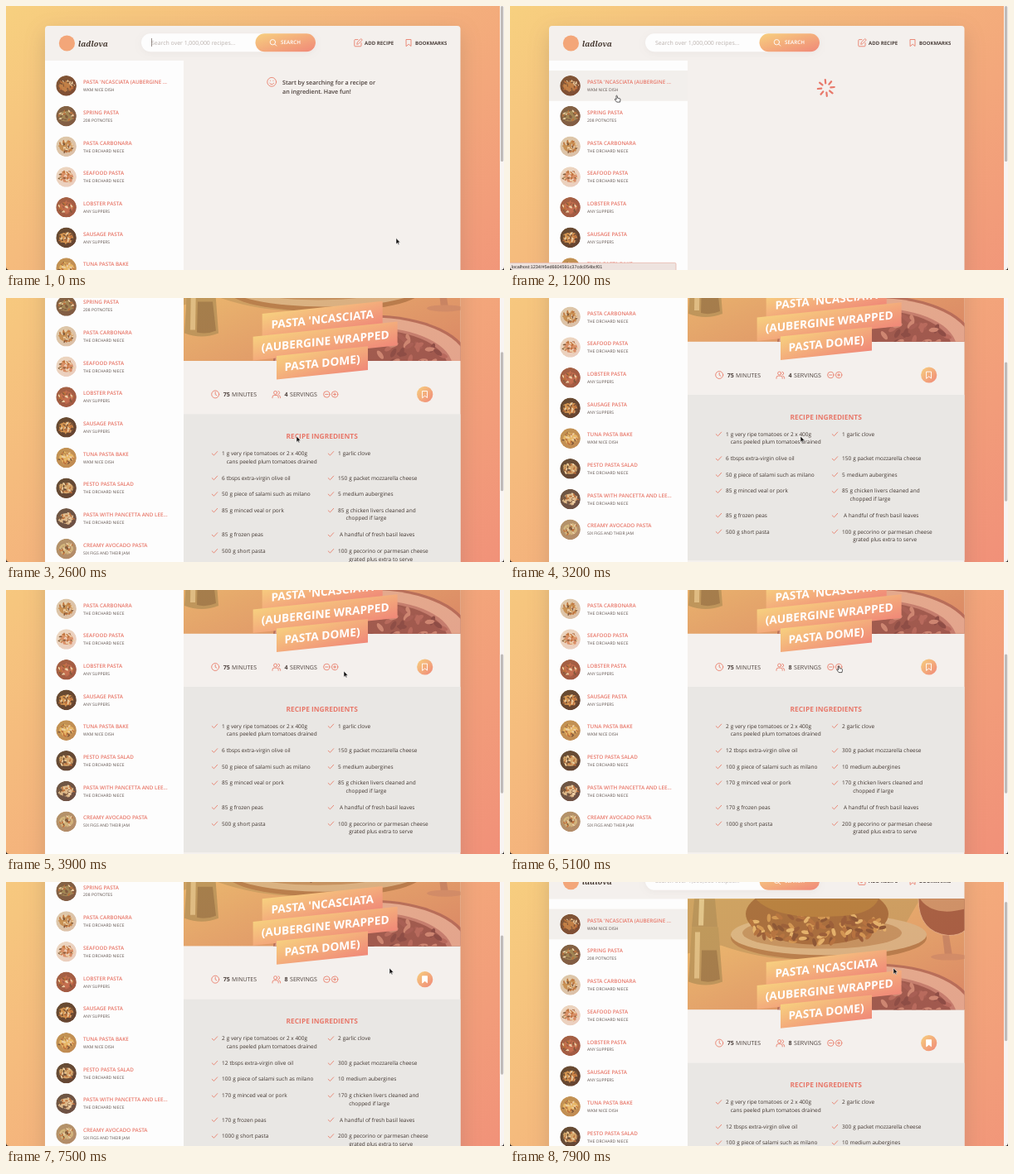
These frames come from a looping animation (600 by 319 pixels, 8000 ms). An HTML page:

```html
<!DOCTYPE html>
<html lang="en">
<head>
<meta charset="utf-8">
<title>Recipe search</title>
<style>
html, body { margin: 0; width: 100%; height: 100%; overflow: hidden; background: #f6c47c; }
svg { display: block; width: 600px; height: 319px; }
text { font-family: "Open Sans", "Noto Sans", sans-serif; text-rendering: geometricPrecision; white-space: pre; }
.line { fill: none; stroke: #e97f6c; stroke-width: .9; stroke-linecap: round; stroke-linejoin: round; }
.white { stroke: #fff; }
</style>
</head>
<body>
<svg id="stage" viewBox="0 0 600 319"></svg>
<script>
const LOOP = 8000, VIEW = 319, SHORT_PAGE = 541, LONG_PAGE = 605;
const CORAL = '#e8786a', INK = '#4c403c', PAPER = '#f4f0ed';
const LOADING = 1080, LOADED = 1650, BOOKMARKED = 6600;
const CLICKS = [4350, 4600, 4850, 5100];
const ROW = 36.7, FONT = 6.5;

// ---- helpers -------------------------------------------------------
const $ = id => document.getElementById(id);
const set = (id, attrs) => { for (const k in attrs) $(id).setAttribute(k, attrs[k]); };
const show = (id, on) => set(id, { visibility: on ? 'visible' : 'hidden' });

// y is the middle of the capitals
const text = (x, y, size, str, fill = INK, weight = 400, more = '') =>
  `<text x="${x}" y="${y + size * .36}" font-size="${size}" fill="${fill}" font-weight="${weight}" ${more}>${str}</text>`;
const line = (d, more = '') => `<path class="line" d="${d}" ${more}/>`;
const shape = (d, fill, more = '') => `<path d="${d}" fill="${fill}" ${more}/>`;
const ring = (x, y, r) => `<circle class="line" cx="${x}" cy="${y}" r="${r}"/>`;
const oval = (x, y, rx, ry, fill, more = '') =>
  `<ellipse cx="${x}" cy="${y}" rx="${rx}" ry="${ry}" fill="${fill}" ${more}/>`;
const rect = (x, y, w, h, fill, more = '') =>
  `<rect x="${x}" y="${y}" width="${w}" height="${h}" fill="${fill}" ${more}/>`;
const ribbon = (x, y, more = '') => line(`M${x - 2.8} ${y - 3.8}h5.6v8l-2.8-2.3-2.8 2.3z`, more);

function random(seed) {
  return () => (seed = seed * 16807 % 2147483647) / 2147483647;
}
function blobs(seed, count, x, y, rx, ry, size, tones) {
  const rnd = random(seed * 7919 + 13);
  let out = '';
  for (let i = 0; i < count; i++) {
    const a = rnd() * 6.283, d = Math.sqrt(rnd());
    const px = (x + Math.cos(a) * d * rx).toFixed(1), py = (y + Math.sin(a) * d * ry).toFixed(1);
    out += oval(px, py, size, size * .45, tones[i % tones.length],
      `transform="rotate(${(rnd() * 180) | 0} ${px} ${py})"`);
  }
  return out;
}

// keys: [time, ...values]
function track(keys, t, ease = u => u) {
  const i = keys.findIndex(k => k[0] > t);
  if (i < 0) return keys[keys.length - 1].slice(1);
  if (!i) return keys[0].slice(1);
  const a = keys[i - 1], b = keys[i], u = ease((t - a[0]) / (b[0] - a[0]));
  return a.slice(1).map((v, j) => v + (b[j + 1] - v) * u);
}
const smooth = u => u * u * (3 - 2 * u);

// ---- content -------------------------------------------------------
const SITES = ['WKM NICE DISH', '208 POTNOTES', 'THE ORCHARD NIECE', 'ANY SUPPERS', 'SIX FIGS AND THEIR JAM'];
// title, site, rim and food tones
const RESULTS = [
  ["PASTA 'NCASCIATA (AUBERGINE ...", 0, '#6b4128', '#b9793f'],
  ['SPRING PASTA', 1, '#6f523a', '#94804e'],
  ['PASTA CARBONARA', 2, '#d9c8b0', '#c08a4c'],
  ['SEAFOOD PASTA', 2, '#ead8ca', '#d48a62'],
  ['LOBSTER PASTA', 3, '#96503a', '#bd6448'],
  ['SAUSAGE PASTA', 3, '#4f3624', '#cf8f48'],
  ['TUNA PASTA BAKE', 0, '#b98a4c', '#e6b962'],
  ['PESTO PASTA SALAD', 2, '#4d3828', '#cfa568'],
  ['PASTA WITH PANCETTA AND LEE...', 2, '#57443a', '#d9b98a'],
  ['CREAMY AVOCADO PASTA', 4, '#a88a66', '#cdb67c']
];

// column x, y, quantity, lines
const INGREDIENTS = [
  [260, 311.3, 1, 'g very ripe tomatoes or 2 x 400g', 'cans peeled plum tomatoes drained'],
  [400, 311.3, 1, 'garlic clove'],
  [260, 340.9, 6, 'tbsps extra-virgin olive oil'],
  [400, 340.9, 150, 'g packet mozzarella cheese'],
  [260, 360.4, 50, 'g piece of salami such as milano'],
  [400, 360.4, 5, 'medium aubergines'],
  [260, 380.1, 85, 'g minced veal or pork'],
  [400, 380.1, 85, 'g chicken livers cleaned and', 'chopped if large'],
  [260, 409.5, 85, 'g frozen peas'],
  [400, 409.5, 0, 'A handful of fresh basil leaves'],
  [260, 429.2, 500, 'g short pasta'],
  [400, 429.2, 100, 'g pecorino or parmesan cheese', 'grated plus extra to serve']
];

const pen = document.createElement('canvas').getContext('2d');
function amount(n) {
  const whole = Math.floor(n), part = ['', '1/4', '1/2', '3/4'][(n - whole) * 4];
  return [whole || '', part].filter(String).join(' ');
}
function ingredients(servings) {
  pen.font = `${FONT}px "Open Sans", "Noto Sans", sans-serif`;
  return INGREDIENTS.map(([x, y, qty, ...lines]) => {
    const label = amount(qty * servings / 4);
    const left = x + pen.measureText(label).width + 2;
    return line(`M${x - 11.8} ${y + .3}l2.3 2.1 4.2-4.6`) + text(x, y, FONT, label, '#40352f') +
      lines.map((s, i) => text(left, y + i * 9.6, FONT, s, '#40352f')).join('');
  }).join('');
}

const result = ([title, site, rim, food], i) => {
  const y = 96.4 + i * ROW;
  return `<g clip-path="url(#dish${i})">` + oval(72.6, y, 12.3, 12.3, rim) +
    oval(72.6, y, 8.5, 6.5, food) +
    blobs(i + 1, 34, 72.6, y, 9, 7, 1.9, [rim, food, '#b5652f', '#ecd7ae', '#6d4a2e']) +
    oval(72.6, y, 12.3, 12.3, 'url(#grad)', 'opacity=".15"') + '</g>' +
    `<clipPath id="dish${i}"><circle cx="72.6" cy="${y}" r="12.3"/></clipPath>` +
    text(93, y - 4.5, 6.3, title, CORAL, 600) + text(93, y + 4.9, 5, SITES[site], '#5f524d');
};

const header =
  oval(73.4, 45, 9.6, 9.6, '#f3a679') +
  text(87, 45.2, 9.2, 'ladlova', '#44372f', 700, 'style="font-family:\'Noto Serif\',\'Liberation Serif\',serif;font-style:italic"') +
  rect(163, 33.2, 210, 22, '#fdfdfd', 'rx="11" style="filter:drop-shadow(0 2px 5px rgba(97,85,81,.06))"') +
  rect(300.5, 33.2, 72.5, 22, 'url(#grad)', 'rx="11"') +
  text(175, 44.2, 6.95, 'Search over 1,000,000 recipes...', '#bbb2ae') +
  rect(175, 39, .7, 10, '#6d605b', 'id="caret"') +
  '<circle class="line white" cx="321.4" cy="43.7" r="3.2"/>' + line('M323.8 46.1l2 2', 'style="stroke:#fff"') +
  text(331, 44.2, 6.3, 'SEARCH', '#fff', 600) +
  line('M424 40.6h-3.4q-.8 0-.8.8v6.6q0 .8.8.8h6.6q.8 0 .8-.8v-3.4M422.8 46l.5-2.1 4.4-4.4 1.6 1.6-4.4 4.4z') +
  text(432, 44.6, 6.05, 'ADD RECIPE', INK, 700) +
  ribbon(485.2, 44.3) + text(493, 44.6, 5.95, 'BOOKMARKS', INK, 700);

const welcome = '<g id="welcome">' + ring(320.2, 91.8, 5.4) +
  line('M317.7 93.3q2.5 3 5 0M318.4 90.2v.1M322 90.2v.1') +
  text(333, 92, 7.15, 'Start by searching for a recipe or', INK, 600) +
  text(333, 103.5, 7.15, 'an ingredient. Have fun!', INK, 600) + '</g>';

const spinner = '<g id="spinner">' + [...Array(8).keys()].map(i =>
  `<path d="M0-5.6V-10" stroke="${CORAL}" stroke-width="2.2" stroke-linecap="round" transform="rotate(${i * 45})"/>`).join('') + '</g>';

// table, plate with the dome, shaker, glass, front plate, fork
const photo = '<g clip-path="url(#frame)">' + rect(214, 65.5, 334, 134.5, 'url(#table)') +
  shape('M214 66h280l-30 52q-110 40-210 4l-40 10z', '#c3985a') +
  oval(384, 113, 118, 27, '#a9713f') + oval(384, 109, 118, 25, '#d3b283') + oval(376, 107, 96, 19, '#b98a58') +
  oval(370, 84, 86, 37, '#945a2c') +
  blobs(5, 120, 370, 99, 82, 20, 5, ['#c98d47', '#713d22', '#dfb066', '#a5612f', '#834727']) +
  shape('M296 66h148q-8 20-54 21-70 4-94-21z', '#a8702f') +
  shape('M222 66h25l3 34h-31z', '#a98650') + shape('M228 66h6l-1 32h-6z', '#dcc48e') +
  shape('M219 100h32l5 66q-20 8-41 0z', '#b08d52') + shape('M223 106h6l-1 56h-6z', '#d9bd84') +
  shape('M231 128h18l4 35q-12 5-23 2z', '#8f6d3e') +
  shape('M492 66q0 40 36 44 14 0 20-6V66z', '#934b34') + shape('M494 66q16 22 54 12V66z', '#c58a62') +
  line('M492 66q0 40 36 44 14 0 20-6', 'style="stroke:#e0b08c"') +
  shape('M521 110h8l4 25h-9z', '#bd7d5c') + oval(529, 136, 22, 4, '#c98762') +
  oval(440, 200, 118, 56, '#a86250') + oval(440, 203, 116, 56, '#e0ac92') +
  oval(440, 207, 98, 48, '#b9776a') + oval(440, 207, 92, 45, '#8a4a42') +
  blobs(9, 80, 440, 192, 88, 26, 6, ['#a85f55', '#723a37', '#c4826f', '#94504a']) +
  line('M360 162q22-4 34-18', 'style="stroke:#e8cdb0;stroke-width:2"') +
  rect(214, 65.5, 334, 134.5, 'url(#grad)', 'opacity=".22"') + '</g>';

const banner = [["PASTA 'NCASCIATA", 381.2, 145], ['(AUBERGINE WRAPPED', 384.6, 174], ['PASTA DOME)', 381, 110]]
  .map(([s, x, w], i) => `<g transform="translate(${x} ${149.2 + i * 26.4}) skewY(-6)">` +
    rect(-w / 2, -14.3, w, 28.6, 'url(#grad)') +
    text(0, 0, 13.7, s, '#fff', 700, 'text-anchor="middle"') + '</g>').join('');

const details = ring(252.2, 240, 4.5) + line('M252.2 237.3v2.9l1.7 1') +
  text(261.7, 240, 7.1, '75', INK, 700) + text(272, 240, 6.95, 'MINUTES') +
  ring(324.6, 238, 2) +
  line('M321 244.3v-1q0-2.2 2.2-2.2h2.8q2.2 0 2.2 2.2v1M328 236.2q1.7.4 1.7 1.9t-1.7 1.9M329 241.3q1.6.5 1.6 2v1') +
  text(335.5, 240, 7.1, '4', INK, 700, 'id="servings"') + text(342, 240, 7.1, 'SERVINGS') +
  [386.3, 396.1].map((x, i) => ring(x, 240, 3.7) + line(`M${x - 1.6} 240h3.2` + (i ? `M${x} 238.4v3.2` : ''))).join('') +
  oval(504.7, 240, 9.6, 9.6, 'url(#grad)') + ribbon(504.7, 239.9, 'id="mark" style="stroke:#fff"');

const recipe = '<g id="recipe">' + photo + banner + details +
  rect(214, 264, 333.5, 200, '#e9e7e4') +
  text(380.7, 290.6, 8.4, 'RECIPE INGREDIENTS', CORAL, 700, 'text-anchor="middle"') +
  '<g id="list"></g></g>';

const grad = (id, from, to) => `<linearGradient id="${id}" x2="1" y2="1"><stop stop-color="${from}"/><stop offset="1" stop-color="${to}"/></linearGradient>`;

$('stage').innerHTML = '<defs>' +
  grad('grad', '#f7d07f', '#f08878') + grad('table', '#ecc06c', '#d48560') +
  '<clipPath id="frame"><rect x="214" y="65.5" width="333.5" height="134.2"/></clipPath></defs>' +
  '<g id="page">' + rect(0, 0, 595, SHORT_PAGE, 'url(#grad)', 'id="back"') +
  rect(47, 24, 500.5, 493, PAPER, 'id="card" rx="3.8" style="filter:drop-shadow(0 8px 12px rgba(97,85,81,.22))"') +
  rect(47, 66, 167, 451, '#fdfdfd', 'id="side"') +
  rect(47, 78, 167, ROW, '#f2efec', 'id="active"') +
  header + RESULTS.map(result).join('') + welcome + spinner + recipe + '</g>' +
  rect(595, 0, 5, VIEW, '#f8f4f2') + rect(596, 0, 3.2, 188, '#bfbbb9', 'id="thumb" rx="1.6"') +
  '<g id="status">' + rect(-2, 310.3, 202, 11, '#eee3df', 'rx="1.5" stroke="#e3a595" stroke-width=".6"') +
  text(1.8, 314.9, 5.45, 'localhost:1234/#5ed6604591c37cdc054bcf01', '#2c2827', 400, 'style="font-family:\'Liberation Sans\',Arial,sans-serif"') + '</g>' +
  shape('M0 315v4h4q-4 0-4-4zM600 315v4h-4q4 0 4-4z', '#2b2422') +
  '<g id="mouse">' +
  shape('M0 0V7.2L1.7 5.7 2.8 8 3.9 7.5 2.8 5.2H5z', '#151313', 'id="arrow" stroke="#fff" stroke-width=".5"') +
  shape('M-.6 0q.8-.7 1.3.2l.4 2.5 2.6.6q.9.3.8 1.2l-.5 3.1h-3.9l-2.3-3q-.1-1 1-.8l.9.8z', '#fff', 'id="hand" stroke="#1c1a1a" stroke-width=".7"') +
  shape('M-1.5-4q1.5 0 1.5 1.2v5.6q0 1.2-1.5 1.2M1.5-4q-1.5 0-1.5 1.2v5.6q0 1.2 1.5 1.2', 'none', 'id="beam" stroke="#2b2624" stroke-width=".7"') + '</g>';

// ---- motion --------------------------------------------------------
const SCROLL = [[2150, 0], [2200, .8], [2300, 20], [2400, 62], [2500, 100], [2600, 123.5], [2750, 138], [3000, 147],
  [7250, 147], [7400, 140], [7600, 105], [7800, 61], [7900, 45.5], [8000, 36]];
const MOUSE = [[0, 470, 280.5], [150, 470, 280.5], [880, 128.5, 108.5], [1700, 128.5, 108.5], [2150, 342, 157.5],
  [2400, 342, 157.5], [2600, 350, 167], [3300, 350, 167], [3900, 407, 98], [4200, 396, 92], [5300, 396, 92],
  [6000, 512, 96.5], [6900, 512, 96.5], [7300, 462, 104], [8000, 462, 104]];
const HAND = [[780, 1800], [4150, 5400], [5900, 7000]], BEAM = [2000, 2450];
const within = (t, [a, b]) => t >= a && t < b;

let shown = 0;
function draw(now) {
  const t = now % LOOP;
  const [scroll] = track(SCROLL, t), [mx, my] = track(MOUSE, t, smooth);
  const ready = t >= LOADED, height = ready ? LONG_PAGE : SHORT_PAGE;

  set('page', { transform: `translate(0 ${-scroll})` });
  set('back', { height });
  set('card', { height: height - 48 });
  set('side', { height: height - 90 });
  set('thumb', { y: scroll * VIEW / height, height: VIEW * VIEW / height });

  show('caret', t < LOADING && t % 1000 < 500);
  show('active', t >= 800);
  show('status', within(t, [820, 1800]));
  show('welcome', t < LOADING);
  show('spinner', within(t, [LOADING, LOADED]));
  set('spinner', { transform: `translate(380.8 99) rotate(${t * .18 + 3})` });
  set('recipe', { display: ready ? 'inline' : 'none' });

  const servings = 4 + CLICKS.filter(c => t >= c).length;
  if (servings !== shown) {
    shown = servings;
    $('servings').textContent = servings;
    $('list').innerHTML = ingredients(servings);
  }
  $('mark').style.fill = t >= BOOKMARKED ? '#fff' : 'none';

  const hand = HAND.some(span => within(t, span)), beam = within(t, BEAM);
  set('mouse', { transform: `translate(${mx} ${my})` });
  show('hand', hand);
  show('beam', beam);
  show('arrow', !hand && !beam);
}

const start = performance.now();
(function tick() {
  draw(performance.now() - start);
  requestAnimationFrame(tick);
})();
</script>
</body>
</html>
```
